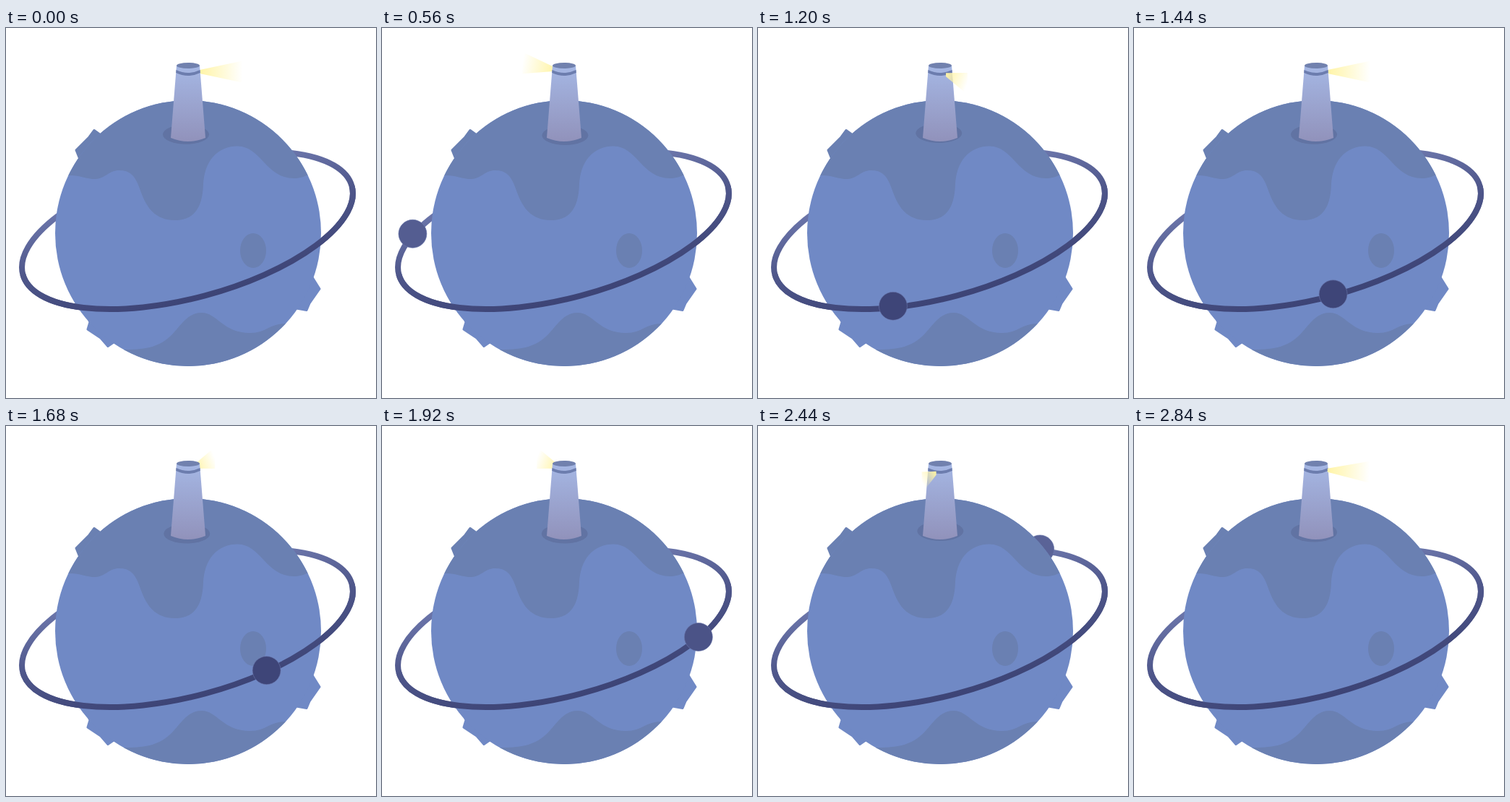
Animation of 512 by 512 pixels, one loop 2.88 s. Source, as an HTML page:

```html
<!DOCTYPE html>
<html lang="en">
<head>
<meta charset="utf-8">
<title>Lighthouse planet</title>
<style>
html, body { margin: 0; width: 100%; height: 100%; overflow: hidden; background: #fff; }
svg { display: block; width: 100%; height: 100%; }
</style>
</head>
<body>
<svg viewBox="0 0 512 512">
  <defs>
    <linearGradient id="ringFill" gradientUnits="userSpaceOnUse" x1="0" y1="-94" x2="0" y2="94">
      <stop offset="0" stop-color="#7580b5"/>
      <stop offset=".5" stop-color="#4f578b"/>
      <stop offset="1" stop-color="#3d4476"/>
    </linearGradient>
    <linearGradient id="towerFill" x1="0" y1="0" x2="0" y2="1">
      <stop offset="0" stop-color="#a5b7e4"/>
      <stop offset="1" stop-color="#9192bb"/>
    </linearGradient>
    <linearGradient id="beamFill" gradientUnits="userSpaceOnUse">
      <stop offset="0" stop-color="#fff4a6"/>
      <stop offset="1" stop-color="#fff4a6" stop-opacity="0"/>
    </linearGradient>
    <clipPath id="globe"><circle cx="252" cy="284" r="184"/></clipPath>
  </defs>

  <g transform="translate(251 280) rotate(-15)" fill="none" stroke="url(#ringFill)" stroke-width="8">
    <ellipse rx="235.7" ry="93.6"/>
  </g>
  <g id="moonBack"></g>

  <g stroke-width="3" stroke-linejoin="round">
    <path d="M103 184 L97 169 L115 151 L122 141.500 L131 148 L140 180Z" fill="#6a80b2" stroke="#6a80b2"/>
    <path d="M424 345 L434 361 L420 381 L416 390.500 L402 388 L400 360Z M112 398 L116 407 L113 417 L131 429 L141 440.500 L149 435 L150 400Z" fill="#7089c5" stroke="#7089c5"/>
  </g>
  <circle cx="252" cy="284" r="184" fill="#7089c5"/>
  <g clip-path="url(#globe)" fill="#6a80b2">
    <path d="M60 204 H87 C100 203 110 209 124 209 C138 208 142 197 157 197 C183 197 182 222 194 243 C203 259 217 266 233 266 C264 266 272 244 273 216 C275 184 292 164 320 163.500 C352 163 360 208 398 208 C406 208 412 206 416 204 H450 V90 H60Z"/>
    <path d="M150 445 H166 C195 445 213 441 230 424 C244 409 252 394 271 394 C292 394 300 422 338 422 C360 422 364 409 388 409 V480 H150Z"/>
    <ellipse cx="342" cy="308" rx="18" ry="24"/>
  </g>
  <g transform="translate(251 280) rotate(-15)" fill="none" stroke="url(#ringFill)" stroke-width="8">
    <path d="M-235.700 0 A235.700 93.600 0 0 0 235.700 0"/>
  </g>

  <ellipse id="shade" rx="32" ry="13.5" fill="#6173a3"/>
  <g id="beamBack"></g>
  <path d="M236 52 L228 152 Q252 162 276 152 L268 52Z" fill="url(#towerFill)"/>
  <path d="M235.500 58 Q252 66 268.500 58 L268.800 62 Q252 70 235.200 62Z" fill="#6c7dae"/>
  <ellipse cx="252" cy="52" rx="16" ry="4" fill="#7181ae"/>
  <g id="beamFront"><path id="beam" fill="url(#beamFill)"/></g>

  <path id="orbit" fill="none" d="M23.300 339 A235.700 93.600 -15 0 0 478.700 217 A235.700 93.600 -15 0 0 23.300 339"/>
  <g id="moonFront"><circle id="moon" r="19.5" stroke="#6b79ad" stroke-opacity=".6"/></g>
</svg>
<script>
const LOOP = 2880, TURN = 1440;
const $ = id => document.getElementById(id);
const orbit = $('orbit'), moon = $('moon'), beam = $('beam'), shade = $('shade'), glow = $('beamFill');
const orbitLength = orbit.getTotalLength();

const set = (el, attrs) => { for (const k in attrs) el.setAttribute(k, attrs[k]); };
const place = (el, parent) => { if (el.parentNode !== parent) parent.appendChild(el); };
const ramp = (t, from, to) => Math.min(1, Math.max(0, (t - from) / (to - from)));
const mix = (a, b, k) => `rgb(${a.map((v, i) => Math.round(v + (b[i] - v) * k))})`;

function drawMoon(t) {
  // constant speed; the left end of the orbit is reached a quarter loop in
  const p = orbit.getPointAtLength(((t / LOOP + 0.75) % 1) * orbitLength);
  const dark = ramp(t, 440, 1040) - ramp(t, 1700, 2160);
  set(moon, { cx: p.x, cy: p.y, fill: mix([90, 99, 151], [62, 69, 120], dark) });
  place(moon, t > 560 && t < 2320 ? $('moonFront') : $('moonBack'));
}

function drawLight(t) {
  const a = t / TURN * 2 * Math.PI, c = Math.cos(a), s = Math.sin(a);
  const x1 = 252 + 16 * c, y1 = 60.5 - 5 * s;
  const x2 = 252 + 75 * c, y2 = 60.5 - 19 * s;
  set(beam, { d: `M${x1} ${y1 - 2.5} L${x2} ${y2 - 15} V${y2 + 15} L${x1} ${y1 + 2.5}Z` });
  set(glow, { x1, y1, x2, y2 });
  place(beam, s >= 0 ? $('beamBack') : $('beamFront'));
  set(shade, { cx: 251.5 - 2.5 * c, cy: 147.3 + 2 * s });
}

function draw(now) {
  const t = now % LOOP;
  drawMoon(t);
  drawLight(t);
}

const start = performance.now();
function tick() {
  draw(performance.now() - start);
  requestAnimationFrame(tick);
}
tick();
</script>
</body>
</html>
```
